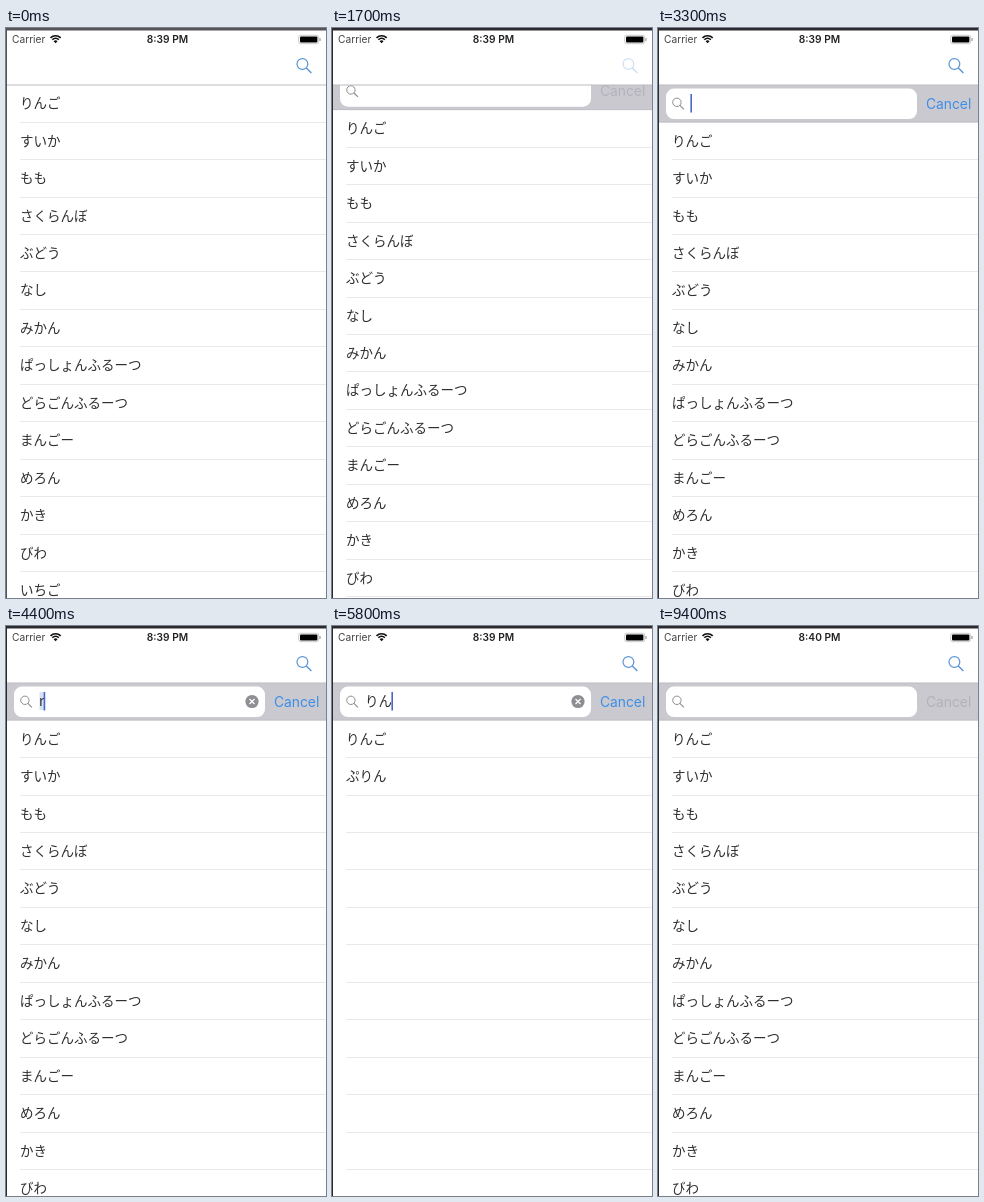
Animation of 320 by 570 pixels, one loop 9500 ms. Source, as an HTML page with a canvas:

```html
<!DOCTYPE html>
<html lang="ja">
<head>
<meta charset="utf-8">
<title>Fruit search</title>
<style>
html, body { margin: 0; width: 100%; height: 100%; overflow: hidden; background: #fff; }
canvas { display: block; width: 320px; height: 570px; }
</style>
</head>
<body>
<canvas id="stage" width="320" height="570"></canvas>
<script>
const ctx = document.getElementById('stage').getContext('2d');
const LOOP = 9500, STEP = 100, ROW = 37.45, NAV_END = 57;
const KANA = '"Noto Sans CJK JP", "Noto Sans CJK", sans-serif';
const LATIN = 'Inter, Roboto, sans-serif';
const BODY_FONT = '350 13.5px ' + KANA;
const BLUE = '#5a94d6', GRAY = '#8e8e93', INK = '#303032';

const fruits = ['りんご', 'すいか', 'もも', 'さくらんぼ', 'ぶどう', 'なし', 'みかん',
  'ぱっしょんふるーつ', 'どらごんふるーつ', 'まんごー', 'めろん', 'かき', 'びわ', 'いちご'];
const matches = ['りんご', 'ぷりん'];

// [start, field text, candidates]
const typing = [
  [0, '', null],
  [4300, 'r', null],
  [4700, 'り', ['り', 'リアル', 'りと']],
  [5300, 'りn', ['り', 'リアル', 'りと']],
  [5500, 'りん', ['りん', 'リンク', '凛']],
  [5800, 'りん', null],
  [8700, '', null]
];
const FOCUS = 2900, COMMIT = 5800, CANCEL = 8700;

const clamp = v => Math.min(1, Math.max(0, v));
const smooth = v => { v = clamp(v); return v * v * (3 - 2 * v); };

function rect(x, y, w, h, color) {
  ctx.fillStyle = color;
  ctx.fillRect(x, y, w, h);
}

function text(str, x, y, font, color, align = 'left') {
  ctx.font = font;
  ctx.fillStyle = color;
  ctx.textAlign = align;
  ctx.fillText(str, x, y);
}

function line(color, width, ...pts) {
  ctx.strokeStyle = color;
  ctx.lineWidth = width;
  ctx.beginPath();
  pts.forEach(([x, y]) => ctx.lineTo(x, y));
  ctx.stroke();
}

function disc(x, y, r, color) {
  ctx.fillStyle = color;
  ctx.beginPath();
  ctx.arc(x, y, r, 0, 7);
  ctx.fill();
}

function lens(x, y, r, tail, color, width) {
  ctx.strokeStyle = color;
  ctx.lineWidth = width;
  ctx.beginPath();
  ctx.arc(x, y, r, 0, 7);
  ctx.stroke();
  const d = r * 0.72;
  line(color, width * 1.2, [x + d, y + d], [x + tail, y + tail]);
}

function rounded(x, y, w, h, r, color) {
  ctx.fillStyle = color;
  ctx.beginPath();
  ctx.roundRect(x, y, w, h, r);
  ctx.fill();
}

function drawList(shift, filtered) {
  const rows = filtered ? matches : fruits;
  for (let i = 0; i < 14; i++) {
    const top = NAV_END + shift + i * ROW;
    if (rows[i]) text(rows[i], 14, top + 23.2, BODY_FONT, INK);
    rect(14, Math.round(top + ROW - 0.8), 306, 1, '#e9e9eb');
  }
}

// The caret shows for half of each second, then fades quickly.
function caretAlpha(t) {
  if (t < FOCUS || t >= CANCEL) return 0;
  if (t >= 4300 && t < 6400) return 1;
  if (t < 3300) return 0.8 * clamp(1 - (t - FOCUS) / 200);
  const phase = (t - (t < 4300 ? 3300 : 5900)) % 1000;
  return phase < 500 ? 1 : 0.65 * clamp(1 - (phase - 500) / 200);
}

function drawSearch(t, shift, value, composing) {
  const y = NAV_END + shift - ROW;
  rect(0, y, 320, ROW, '#cbc9d0');
  rect(0, y + ROW - 1, 320, 1, '#c1c0c6');
  rounded(8, y + 3.6, 251, 30.4, 8, '#fff');
  lens(18.9, y + 17.3, 4.2, 7, GRAY, 1);
  const active = t >= FOCUS && t < CANCEL;
  const cancelColor = active ? '#3d8ee6' : '#b3b2b9';
  text('Cancel', 268, y + 23.5, '13.8px ' + LATIN, cancelColor);

  ctx.font = BODY_FONT;
  const end = 33 + ctx.measureText(value).width;
  if (composing) rect(33.5, y + 9, end - 33.5, 18, '#d6e1f4');
  if (value) {
    text(value, 33, y + 23.2, BODY_FONT, INK);
    disc(246, y + 18.5, 6.6, GRAY);
    line('#fff', 1.3, [243.5, y + 16], [248.5, y + 21]);
    line('#fff', 1.3, [248.5, y + 16], [243.5, y + 21]);
  }
  ctx.globalAlpha = caretAlpha(t);
  rect(end - 0.6, y + 9, 1.6, 18.5, '#4966c8');
  ctx.globalAlpha = 1;
}

function drawCandidates(words) {
  ctx.save();
  ctx.shadowColor = 'rgba(0,0,0,.2)';
  ctx.shadowBlur = 2;
  ctx.shadowOffsetY = 1;
  rect(33.5, 85, 265, 33.5, '#fff');
  ctx.restore();
  ctx.strokeStyle = '#c6c6c9';
  ctx.lineWidth = 1;
  ctx.strokeRect(33.5, 84.5, 265, 34);
  words.forEach((word, i) => text(word, 67 + i * 80, 106.5, '350 15.7px ' + KANA, INK, 'center'));
  line('#333', 1.2, [278, 99.8], [281, 102.5], [284, 99.8]);
}

function drawStatus(t) {
  text('Carrier', 6, 15.2, '10.2px ' + LATIN, '#444');
  const clock = t >= 7500 ? '8:40 PM' : '8:39 PM';
  text(clock, 161.5, 15.2, '600 10.2px ' + LATIN, '#222', 'center');
  ctx.strokeStyle = '#111';
  ctx.lineWidth = 1.6;
  for (const r of [7.2, 4.6]) {
    ctx.beginPath();
    ctx.arc(49.6, 15, r, -Math.PI * 0.75, -Math.PI * 0.25);
    ctx.stroke();
  }
  ctx.fillStyle = '#111';
  ctx.beginPath();
  ctx.moveTo(49.6, 15.2);
  ctx.arc(49.6, 15.2, 2.8, -Math.PI * 0.75, -Math.PI * 0.25);
  ctx.fill();

  ctx.strokeStyle = '#b4b4b4';
  ctx.lineWidth = 0.7;
  ctx.beginPath();
  ctx.roundRect(292.7, 7.3, 20, 8.4, 2);
  ctx.stroke();
  rounded(294, 8.5, 17.4, 6, 1, '#000');
  rect(313.4, 10, 1.2, 3, '#a0a0a0');
}

function drawNav(t) {
  rect(0, 0, 320, NAV_END, '#fff');
  rect(0, NAV_END - 0.5, 320, 1, '#bcbcbf');
  drawStatus(t);
  ctx.globalAlpha = t < 1600 ? 1 : 0.3 + 0.7 * smooth((t - 1700) / 400);
  lens(296.4, 36, 5.4, 9, BLUE, 1.2);
  ctx.globalAlpha = 1;
}

function draw(t) {
  const shift = ROW * smooth((t - 1540) / 260);
  const [, value, words] = typing.findLast(s => t >= s[0]);
  const composing = t >= 4300 && t < COMMIT;

  rect(0, 0, 320, 570, '#fff');
  drawList(shift, t >= COMMIT && t < CANCEL);
  if (shift > 0) drawSearch(t, shift, value, composing);
  drawNav(t);
  if (words) drawCandidates(words);

  const edge = t < 1600 ? '#555558' : '#2b2a2e';
  rect(0, 0, 320, 2.5, edge);
  rect(0, 0, 1, 570, edge);
}

const start = performance.now();
function tick() {
  const t = (performance.now() - start) % LOOP;
  draw(Math.floor(t / STEP) * STEP);
  requestAnimationFrame(tick);
}
tick();
</script>
</body>
</html>
```
